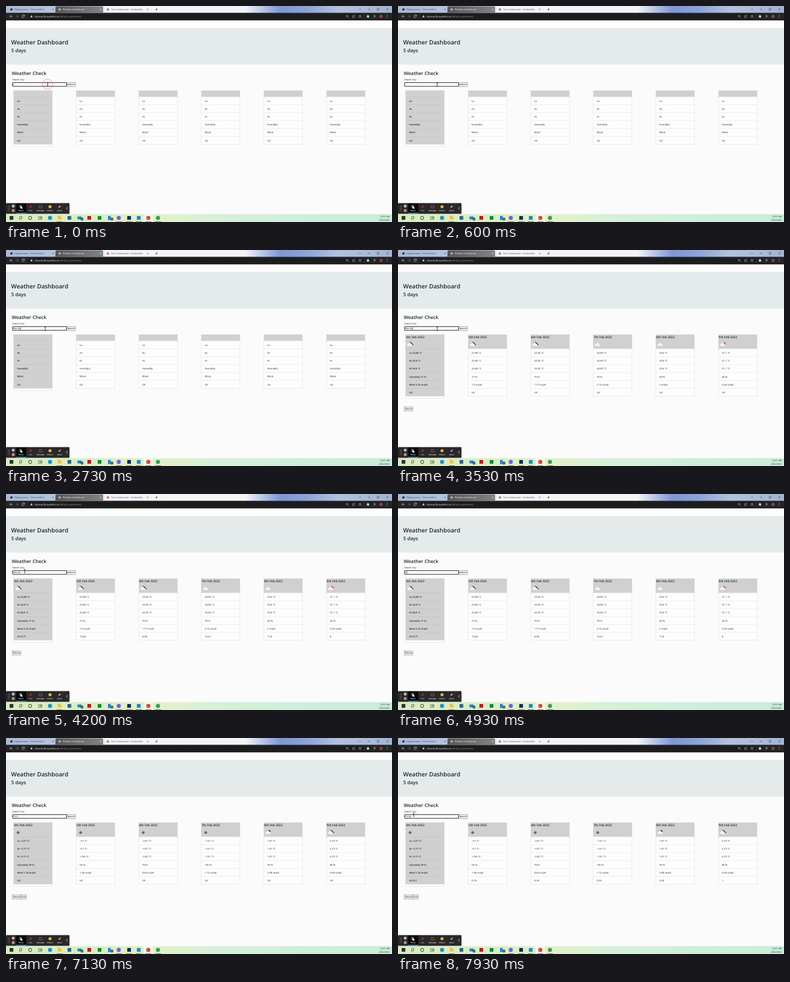
An HTML page that plays this animation: 640x360 px, repeating every 8000 ms.

```html
<!DOCTYPE html>
<html lang="en">
<head>
<meta charset="utf-8">
<title>Weather Dashboard</title>
<style>
  html, body { margin: 0; width: 100%; height: 100%; overflow: hidden; background: #fbfbfb; }
  svg { display: block; width: 100vw; height: 100vh; }
  text { font-family: "Open Sans", "Noto Sans", sans-serif; fill: #212529; white-space: pre; text-rendering: geometricPrecision; }
  .line { fill: none; stroke: #c8c8c8; stroke-width: .7; }
  .button { fill: #efefef; stroke: #767676; stroke-width: .5; }
  #pointer { animation: pointer 8s infinite; }
  #ring { animation: ring 8s linear infinite; }
  @keyframes pointer {
    0%, 1% { transform: translate(69px, 130.5px); opacity: 1; animation-timing-function: ease-in-out; }
    7.5%, 48% { transform: translate(65px, 131px); opacity: 1; animation-timing-function: ease-in-out; }
    54%, 59.9% { transform: translate(26px, 128px); opacity: 1; }
    60%, 91.5% { transform: translate(26px, 128px); opacity: 0; animation-timing-function: step-end; }
    91.6%, 100% { transform: translate(26px, 128px); opacity: 1; animation-timing-function: step-end; }
  }
  @keyframes ring {
    0%, 1% { opacity: 1; }
    5%, 100% { opacity: 0; }
  }
</style>
</head>
<body>
<svg id="stage" viewBox="0 0 640 360" preserveAspectRatio="none">
  <defs>
    <linearGradient id="strip">
      <stop offset="0" stop-color="#a9b8d6"/>
      <stop offset=".12" stop-color="#b4c2dc"/>
      <stop offset=".27" stop-color="#f1f3f7"/>
      <stop offset=".62" stop-color="#f3f4f8"/>
      <stop offset=".71" stop-color="#8096d4"/>
      <stop offset=".78" stop-color="#8ea3d6"/>
      <stop offset=".86" stop-color="#b3c1dc"/>
      <stop offset="1" stop-color="#a3b4d2"/>
    </linearGradient>
    <linearGradient id="active">
      <stop offset="0" stop-color="#555"/>
      <stop offset="1" stop-color="#858585"/>
    </linearGradient>
    <linearGradient id="bar">
      <stop offset="0" stop-color="#d6edbf"/>
      <stop offset=".45" stop-color="#e0f1cd"/>
      <stop offset=".53" stop-color="#d6f0da"/>
      <stop offset="1" stop-color="#c9edda"/>
    </linearGradient>
  </defs>
  <g id="browser"></g>
  <g id="page"></g>
  <g id="cards"></g>
  <g id="history"></g>
  <g id="field"></g>
  <g id="tools"></g>
  <g id="taskbar"></g>
  <g id="pointer">
    <circle id="ring" r="8.6" fill="#e04040" fill-opacity=".03" stroke="#e88080" stroke-width=".7"/>
    <path d="M-1.2-2.6H1.2M0-2.6V2.6M-1.2 2.6H1.2" fill="none" stroke="#222" stroke-width=".8"/>
  </g>
</svg>
<script>
const LOOP = 8000;
const $ = id => document.getElementById(id);
const rect = (x, y, w, h, fill, more = '') =>
  `<rect x="${x}" y="${y}" width="${w}" height="${h}" fill="${fill}" ${more}/>`;
const dot = (x, y, r, fill, more = '') => `<circle cx="${x}" cy="${y}" r="${r}" fill="${fill}" ${more}/>`;
const text = (x, y, size, str, more = '') => `<text x="${x}" y="${y}" font-size="${size}" ${more}>${str}</text>`;
const line = (d, color = '#c8c8c8', width = .7) =>
  `<path class="line" d="${d}" style="stroke:${color};stroke-width:${width}"/>`;
const cross = (x, y, r, color) => line(`M${x - r} ${y - r}l${2 * r} ${2 * r}m0 ${-2 * r}l${-2 * r} ${2 * r}`, color, .6);

function browser() {
  const tab = (x, color, label, end, ink = '#454b57') =>
    dot(x, 5.7, 2, color) + text(x + 5, 7.1, 3.8, label, `style="fill:${ink}"`) + cross(end, 5.7, 1.1, ink);
  return rect(0, 0, 640, 11.5, 'url(#strip)') + rect(0, 11.3, 640, 12.7, '#242424') +
    `<path d="M80 11.500q2 0 2-2V2.500q0-2 2-2H159q2 0 2 2V9.500q0 2 2 2z" fill="url(#active)"/>` +
    tab(9, '#2b3038', 'Deployments · Tolvena38/cli', 78) +
    tab(89, '#a8adb2', 'Weather Dashboard', 157, '#f2f2f2') +
    tab(169, '#e5686b', 'Your Screencasts - Framolivity', 235) +
    line('M247.500 5.700h4M249.500 3.700v4', '#444') +
    line('M585.500 4.800l1.500 1.500l1.500-1.500M600 5.500h3.500M631 4l3 3m0-3l-3 3', '#333', .6) +
    rect(615.5, 4, 3, 3, 'none', 'stroke="#333" stroke-width=".5"') +
    line('M11 17.200h-4.500m2-2l-2 2l2 2', '#ddd') + line('M16 17.200h4.500m-2-2l2 2l-2 2', '#777') +
    line('M30.300 15.800a2.100 2.100 0 1 0 .3 2m0-3v1.500h-1.500', '#ddd') +
    rect(36, 13, 556, 8.6, '#1c1c1c', 'rx="4.3"') +
    rect(40.8, 16.8, 2.8, 2.2, '#ccc') + line('M41.400 17v-1a.8.8 0 0 1 1.600 0v1', '#ccc', .5) +
    text(47, 18.7, 4.2, 'tolvena38.quenbo.io<tspan style="fill:#9a9a9a">/climate_overviews/</tspan>', 'style="fill:#eee"') +
    dot(565.5, 16.8, 1.4, 'none', 'stroke="#ccc" stroke-width=".6"') + line('M566.500 17.900l1.500 1.500', '#ccc') +
    line('M576 16h-1.500v3h4v-1.200M576 17.500q.5-1.700 2.700-1.700m-1-1l1 1l-1 1', '#ccc', .5) +
    `<path d="M587 14.800l.7 1.600l1.700.1l-1.300 1.100l.4 1.700l-1.500-.9l-1.500.9l.4-1.700l-1.300-1.100l1.700-.1z" class="line" style="stroke-width:.5"/>` +
    rect(598.5, 16, 3.4, 3.2, '#ddd', 'rx=".5"') + dot(600.2, 15.8, .9, '#ddd') +
    line('M609.500 15.800h3.500M609.500 17.300h3.500M609.500 18.800h2', '#ccc', .6) +
    dot(622, 17.2, 2.7, '#8a4238') +
    [15.4, 17.2, 19].map(y => dot(632, y, .5, '#ddd')).join('');
}

function page() {
  return rect(0, 24, 640, 323, '#fbfbfb') + rect(0, 24, 640, 12.5, '#fdfdfd') + rect(0, 36.5, 640, 61.2, '#e4ebea') +
    text(8.6, 64.3, 9.8, 'Weather Dashboard', 'font-weight="600"') +
    text(8.8, 77, 8, '5 days', 'font-weight="600"') +
    text(9.5, 115, 7.9, 'Weather Check', 'font-weight="600"') +
    text(10.5, 123.6, 3.9, 'Search City') +
    rect(101, 127.6, 14.3, 6.8, '#efefef', 'class="button"') + text(102, 132.4, 3.95, 'Search');
}

function tools() {
  const label = (x, str) =>
    text(x, 342, 2.7, str, 'text-anchor="middle" font-weight="600" style="fill:#fff"');
  return rect(0, 328.5, 105.3, 18, '#292929', 'rx="1"') +
    [334, 337, 340].map(y => dot(4, y, .5, '#aaa') + dot(5.8, y, .5, '#aaa')).join('') +
    dot(12, 333.5, 2.3, '#e9e9e9') + cross(12, 333.5, .9, '#333') +
    dot(12, 341, 2.3, '#e9e9e9') + dot(12, 341, 1.5, '#d63a32') +
    rect(17, 329, 16.5, 17, '#080808') + rect(17, 344.6, 16.5, 1.3, '#2b93e6') +
    dot(24, 334, 1.8, 'none', 'stroke="#fff" stroke-width=".6"') +
    `<path d="M24 333v5l1.400-1.200l1 1.700l.9-.5l-1-1.600h1.800z" fill="#fff"/>` + label(25, 'Mouse') +
    line('M39 336.500l3.500-3.500', '#e5342b', 1.5) + label(41, 'Pen') +
    rect(55, 332.8, 4.3, 3.8, 'none', 'stroke="#e5342b" stroke-width=".9"') + label(57, 'Rectangle') +
    dot(73, 334.6, 2.5, '#f2b632') + label(73, 'Stickers') +
    line('M87.300 336l3.200-2.800', '#e78a93', 2.2) + label(89, 'Eraser') +
    line('M102 335l-1.800 2.200l1.800 2.200', '#eee', .8);
}

function taskbar() {
  const square = (x, color) => rect(x - 3, 350.1, 6.2, 6.2, color, 'rx=".6"');
  const round = (x, color) => dot(x, 353.2, 3.4, color);
  const badge = (x, n) => dot(x, 355, 2.5, '#3b4650') + text(x, 356.1, 3, n, 'text-anchor="middle" style="fill:#fff"');
  const running = [89, 187, 204, 220, 236, 252];
  return rect(0, 346.8, 640, 13.2, 'url(#bar)') + rect(228.5, 346.8, 15, 13.2, '#fff', 'opacity=".6"') +
    square(9, '#2f3437') +
    dot(24.5, 352.6, 2.2, 'none', 'stroke="#222" stroke-width=".7"') + line('M24 354.300l-1.900 1.900', '#222') +
    dot(40, 353.2, 2.7, 'none', 'stroke="#222" stroke-width=".9"') +
    rect(54, 351.2, 3.8, 4, 'none', 'stroke="#222" stroke-width=".6"') + line('M59.200 350.500v5.500', '#222') +
    round(73, '#2290cc') +
    rect(86, 350.6, 6.2, 5.2, '#efc24b') + rect(86, 350, 2.8, 1.2, '#d99f2c') +
    square(105, '#37618a') + rect(118.5, 350.8, 6.6, 4.8, '#1b82cf') + badge(126, '24') +
    square(138, '#b3202c') + square(155, '#168a35') +
    rect(169, 349.7, 4.6, 7, '#2089d5', 'rx=".6"') + badge(175.5, '23') +
    round(187, '#7b5bd6') + square(204, '#0b2f5b') + square(220, '#2485c9') +
    round(236, '#d9473c') + round(252, '#3d9d58') +
    running.map(x => rect(x - 5, 359, 10, 1, '#3f8fc4')).join('') +
    text(636, 351.6, 3.7, '12:41 AM', 'text-anchor="end"') + text(636, 357.5, 3.7, '4/02/2022', 'text-anchor="end"');
}

const labels = ['Lo', 'Av', 'Hi', 'Humidity', 'Wind', 'UV'];
const units = [' °C', ' °C', ' °C', ' %', ' m/ph', ''];
// Each day: sky, low, average, high, humidity, wind, UV
const cities = {
  Manila: ['rain 24.86 26.8 26.8 71 3.14 9.71', 'rain 23.98 25.66 25.66 73 1.9 10.66', 'rain 23.43 24.55 24.55 76 1.77 8.68',
    'cloud 24.85 24.85 24.85 70 2.15 10.41', 'cloud 29.6 29.6 29.6 49 2 7.16', 'sun 31.1 31.1 31.1 44 4.36 8'],
  Oslo: ['snow -3.77 -3.77 -3.72 59 1.24 0.2', 'snow -3.7 -3.7 -3.56 58 1.56 0.33', 'snow -3.01 -3.01 -2.63 78 0.65 0.39',
    'snow -1.61 -1.61 -1.61 100 1.12 0.33', 'sleet 1.81 1.81 1.81 90 3.98 0.43', 'rain 4.73 4.73 4.73 98 5.69 1']
};

function sky(kind, x, y) {
  if (kind === 'snow') {
    const arms = [0, 60, 120].map(a => `<path d="M-2.600 0H2.600" transform="rotate(${a})"/>`).join('');
    return `<g transform="translate(${x} ${y})" stroke="#555" stroke-width=".8">${arms}` +
      dot(0, 0, 1.7, 'none', 'stroke-width=".6"') + '</g>';
  }
  const behind = {
    rain: `<path d="M${x - 1} ${y - 4}q2-.8 3.500 1l3 3.500q-.5 1.500-2 .8z" fill="#454545"/>`,
    sleet: `<path d="M${x} ${y - 4}q3-.8 4 1.300l-.5 1.700l-2.500-.5z" fill="#454545"/>`,
    sun: dot(x + 2.6, y - 1.8, 2.4, '#e8714f'),
    cloud: ''
  }[kind];
  return behind + `<path d="M${x - 3.5} ${y + 2.5}q-2-.4-1.300-2.200q.6-1.200 1.800-1q.8-2.600 3-2.200q1.900.3 2.200 2.300q2 .2 1.900 1.700q-.2 1.400-1.600 1.400z" fill="#f2f2f2"/>`;
}

function card(i, city, withUv) {
  const x = 12.8 + 103.7 * i, first = i === 0;
  const top = city ? 164.6 : 151.3, step = 13.2, end = top + 6 * step;
  const [kind, ...values] = city ? cities[city][i].split(' ') : [];
  let out = first ? rect(x, 141, 64, end - 141 + 3.8, '#fdfdfd', 'stroke="#d9d9d9" stroke-width=".5"') : '';
  out += rect(x, 141, 64, end - 141, first ? '#d0d0d0' : '#fdfdfd', 'stroke="#d9d9d9" stroke-width=".5"') +
    rect(x, 141, 64, top - 141, '#d0d0d0');
  if (city) out += text(x + .3, 146.7, 5, `${4 + i}th Feb 2022`, 'font-weight="600"') + sky(kind, x + 7.3, 157.6);
  labels.forEach((label, row) => {
    const y = top + row * step;
    const empty = !city || (row === 5 && !withUv);
    const value = empty ? '' : values[row] + units[row];
    const str = empty ? label : first ? `${label} ${value}` : value;
    out += line(`M${x} ${y}h64`, first ? '#bcbcbc' : '#dcdcdc', .5) +
      text(x + 5.6, y + 8.3, first ? 4.05 : 4.15, str, first ? 'font-weight="600"' : '');
  });
  return out;
}

function history(names) {
  let x = 10.6;
  return names.map(name => {
    const w = name === 'Manila' ? 13.8 : 9.4;
    const out = rect(x, 261.4, w, 6.8, '#efefef', 'class="button"') + text(x + .8, 266.2, 3.95, name);
    x += w;
    return out;
  }).join('');
}

const typing = [[0, ''], [1330, 'M'], [1660, 'Ma'], [1800, 'Man'], [1930, 'Mani'], [2130, 'Manil'], [2330, 'Manila'],
  [4800, 'O'], [5130, 'Os'], [5330, 'Osl'], [5530, 'Oslo']];
const results = [[0, ''], [3130, 'Manila'], [3800, 'Manila', true], [6800, 'Oslo'], [7260, 'Oslo', true]];
const latest = (list, t) => list.filter(([at]) => at <= t).pop();

$('browser').innerHTML = browser();
$('page').innerHTML = page();
$('tools').innerHTML = tools();
$('taskbar').innerHTML = taskbar();
$('field').innerHTML = rect(10.8, 127.7, 89.6, 6.2, '#fff', 'rx=".7" stroke="#111" stroke-width=".9"') +
  rect(11.4, 128.6, 13, 4.8, '#3b82d6', 'id="selection"') +
  text(11.5, 132.4, 3.95, '', 'id="typed"') + rect(11.6, 128.8, .5, 4.3, '#111', 'id="caret"');

let shown, start;
function draw(now) {
  start ??= now;
  const t = (now - start) % LOOP;
  const [typedAt, word] = latest(typing, t);
  const [, city, withUv] = latest(results, t);
  const selected = t > 4400 && t < 4800;
  const key = city + withUv;
  if (key !== shown) {
    shown = key;
    $('cards').innerHTML = Array.from({ length: 6 }, (_, i) => card(i, city, withUv)).join('');
    $('history').innerHTML = history(city ? Object.keys(cities).slice(0, city === 'Oslo' ? 2 : 1) : []);
  }
  const typed = $('typed');
  if (typed.textContent !== word) typed.textContent = word;
  typed.style.fill = selected ? '#fff' : '';
  $('selection').style.opacity = selected ? 1 : 0;
  $('caret').setAttribute('x', 11.6 + (word ? typed.getComputedTextLength() : 0));
  $('caret').style.opacity = !selected && (t - typedAt) % 1000 < 500 ? 1 : 0;
  requestAnimationFrame(draw);
}
requestAnimationFrame(draw);
</script>
</body>
</html>
```
